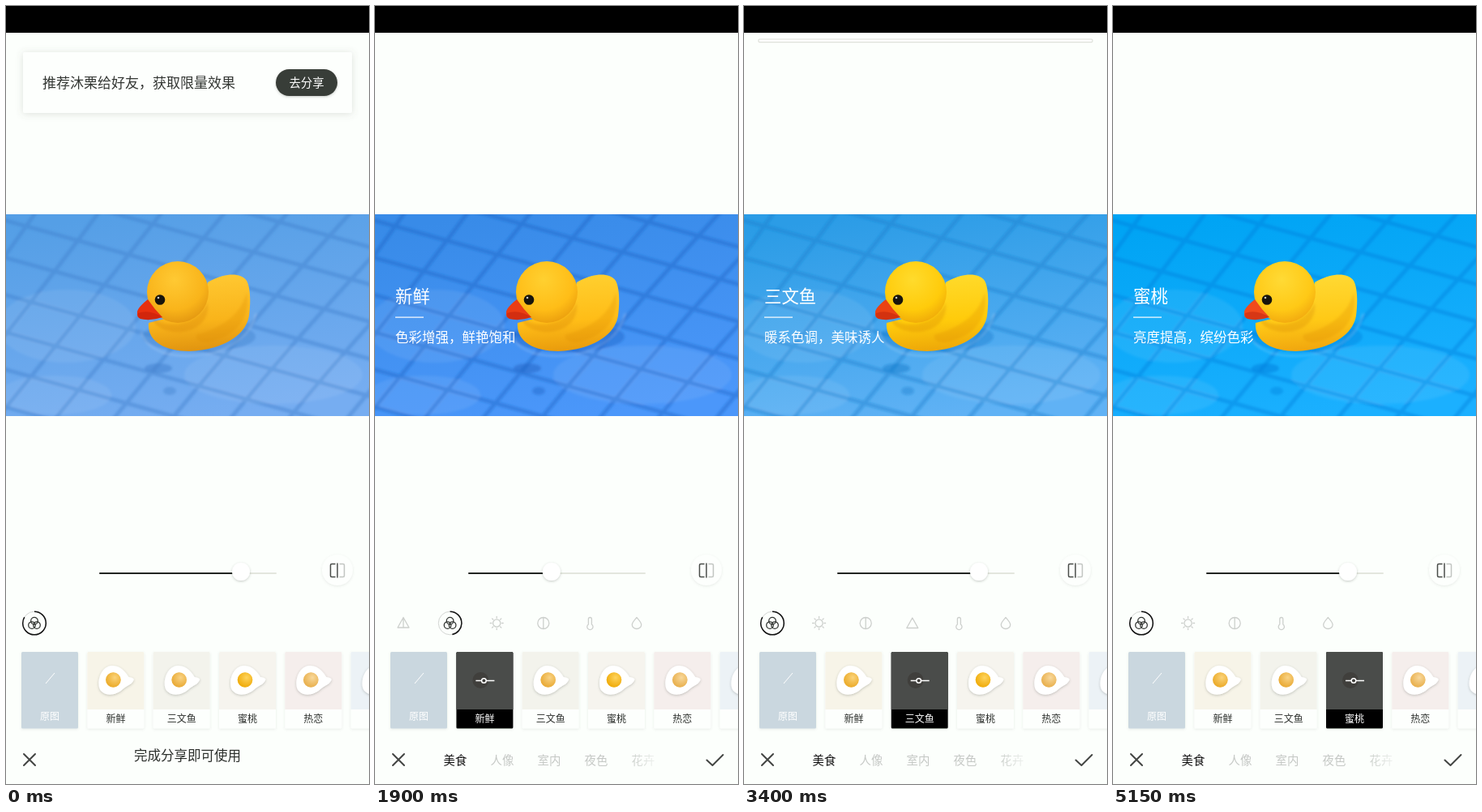
These frames come from a looping animation (448 px wide and 960 px high, 5.2 s). An HTML page:

```html
<!DOCTYPE html>
<html lang="zh-CN">
<head>
<meta charset="utf-8">
<title>滤镜</title>
<style>
  html, body { margin: 0; width: 100%; height: 100%; overflow: hidden; background: #fefefe; }
  svg { display: block; width: 100vw; height: 100vh; }
  text { font-family: "Noto Sans CJK SC", "Noto Sans CJK", "Noto Sans", sans-serif; }
  .mid { text-anchor: middle; }
  .line { fill: none; stroke-linecap: round; stroke-linejoin: round; }
  .thin { font-weight: 300; fill: #fff; }
</style>
</head>
<body>
<svg viewBox="0 0 448 960" xmlns="http://www.w3.org/2000/svg">
  <defs>
    <linearGradient id="water" x1="0.3" y1="0" x2="0.6" y2="1">
      <stop id="w0" offset="0"/><stop id="w1" offset="1"/>
    </linearGradient>
    <radialGradient id="head" cx="0.45" cy="0.3" r="0.75">
      <stop id="d0" offset="0"/><stop id="d1" offset="0.65"/><stop id="d2" offset="1"/>
    </radialGradient>
    <linearGradient id="body" x1="0.45" y1="0" x2="0.55" y2="1">
      <stop id="b0" offset="0"/><stop id="b1" offset="0.6"/><stop id="b2" offset="1"/>
    </linearGradient>
    <radialGradient id="yolk" cx="0.6" cy="0.35" r="0.7">
      <stop offset="0" stop-color="#fff" stop-opacity="0.35"/>
      <stop offset="1" stop-color="#c87800" stop-opacity="0.3"/>
    </radialGradient>
    <linearGradient id="fadeTab">
      <stop offset="0" stop-color="#ccd0cc"/><stop offset="1" stop-color="#eef1ee"/>
    </linearGradient>
    <filter id="soft" x="-20%" y="-20%" width="140%" height="140%"><feGaussianBlur stdDeviation="1.6"/></filter>
    <filter id="shade" x="-20%" y="-40%" width="140%" height="180%">
      <feDropShadow dx="0" dy="1" stdDeviation="5" flood-color="#60685c" flood-opacity="0.2"/>
    </filter>
    <filter id="small" x="-40%" y="-40%" width="180%" height="180%">
      <feDropShadow dx="0" dy="1" stdDeviation="1.6" flood-color="#404840" flood-opacity="0.3"/>
    </filter>
    <filter id="faint" x="-30%" y="-30%" width="160%" height="160%">
      <feDropShadow dx="0" dy="1" stdDeviation="1.5" flood-color="#606860" flood-opacity="0.14"/>
    </filter>
    <clipPath id="frame"><rect y="257" width="448" height="249"/></clipPath>
  </defs>

  <rect width="448" height="960" fill="#fcfffc"/>

  <rect id="bar" x="18" y="41" height="3.6" rx="1" fill="#fff" stroke="#dde0d9" stroke-width="1.2"/>
  <g id="banner">
    <rect x="21" y="57" width="406" height="75" rx="2" fill="#fdfffd" filter="url(#shade)"/>
    <text x="45" y="101" font-size="17" fill="#333633">推荐沐栗给好友，获取限量效果</text>
    <rect x="333" y="78" width="76" height="33" rx="16.5" fill="#393c37" filter="url(#small)"/>
    <text class="mid" x="371" y="99.5" font-size="14.4" fill="#fff">去分享</text>
  </g>
  <rect width="448" height="33" fill="#000"/>

  <g clip-path="url(#frame)">
    <rect y="257" width="448" height="249" fill="url(#water)"/>
    <g filter="url(#soft)">
      <path id="tiles" class="line" stroke-width="5" stroke-opacity="0.42"/>
      <g id="glow" fill="#fff" fill-opacity="0.07">
        <ellipse cx="75" cy="395" rx="85" ry="45"/>
        <ellipse cx="330" cy="455" rx="110" ry="36"/>
        <ellipse cx="60" cy="480" rx="70" ry="24"/>
      </g>
      <g id="ripple">
        <ellipse cx="238" cy="408" rx="70" ry="19" fill-opacity="0.4"/>
        <ellipse cx="188" cy="447" rx="17" ry="6" fill-opacity="0.5"/>
        <ellipse cx="202" cy="475" rx="8" ry="5" fill-opacity="0.4"/>
      </g>
      <path d="M167 403C176 431 215 435 247 430C280 424 304 403 308 380" class="line" stroke="#fff" stroke-opacity="0.22" stroke-width="1.6"/>
    </g>
    <path fill="url(#body)" d="M176 391C174 414 196 426 226 426C264 425 296 408 300 382C302 366 302 348 297 339C288 327 266 331 249 341L240 375Z"/>
    <path fill="#d98600" fill-opacity="0.25" filter="url(#soft)" d="M236 405C268 397 291 379 297 353C303 386 283 408 250 415C240 416 231 411 236 405Z"/>
    <path fill="#c97400" fill-opacity="0.22" filter="url(#soft)" d="M182 386C205 400 237 392 249 366C252 390 232 404 207 402C192 400 182 394 182 386Z"/>
    <ellipse cx="212" cy="353" rx="38" ry="38" fill="url(#head)"/>
    <path id="beak" d="M162 379C161 374 169 367 175 362Q183 374 193 384Q178 389 166 386Q161 384 162 379Z"/>
    <path d="M163 379Q177 374 193 384Q178 389 166 386Q162 384 163 379Z" fill="#a81408" fill-opacity="0.35"/>
    <circle cx="190" cy="362.500" r="6.300" fill="#17140c"/>
    <circle cx="188" cy="360" r="1.300" fill="#fff" fill-opacity="0.75"/>
    <g id="caption">
      <text id="title" class="thin" x="25" y="366" font-size="21.4"></text>
      <rect x="25" y="383.500" width="35" height="1.200" fill="#fff"/>
      <text id="note" class="thin" x="25" y="415" font-size="16.5"></text>
    </g>
  </g>

  <rect x="115" y="699" width="219" height="2" rx="1" fill="#e3e6de"/>
  <rect id="level" x="115" y="699" height="2" rx="1" fill="#222522"/>
  <circle id="knob" cy="698" r="11" fill="#fff" filter="url(#small)"/>

  <circle cx="409" cy="696" r="19" fill="#fdfffd" filter="url(#faint)"/>
  <g class="line" stroke-width="1.5">
    <path d="M406 688.500H402Q400.500 688.500 400.500 690V703Q400.500 704.500 402 704.500H406" stroke="#4a4d4a"/>
    <path d="M409 688V705" stroke="#4a4d4a"/>
    <path d="M412 688.500H416Q417.500 688.500 417.500 690V703Q417.500 704.500 416 704.500H412" stroke="#c2c5c2"/>
  </g>

  <g id="tools"></g>
  <g id="picked">
    <circle cy="761.500" r="14.300" fill="none" stroke="#d3d6d3"/>
    <circle id="ring" cy="761.500" r="14.300" fill="none" stroke="#111" stroke-width="1.500" pathLength="1"/>
  </g>
  <g id="cards"></g>

  <path class="line" d="M22 923L36 937M36 923L22 937" stroke="#434643" stroke-width="2"/>
  <text id="locked" class="mid" x="224" y="931" font-size="16.5" fill="#2b2e2b">完成分享即可使用</text>
  <g id="tabs">
    <path class="line" d="M409.500 930.500L416.500 937L429.500 924" stroke="#434643" stroke-width="2"/>
  </g>
  <rect id="veil" width="448" height="960" fill="#fefefe"/>
</svg>

<script>
const LOOP = 5200, STEP = 50;
const $ = id => document.getElementById(id);
const set = (id, name, value) => $(id).setAttribute(name, value);
const show = (id, on) => set(id, 'display', on ? 'inline' : 'none');
const part = (t, from, span) => Math.min(1, Math.max(0, (t - from) / span));
const easeOut = p => 1 - (1 - p) ** 2;
const easeBoth = p => (1 - Math.cos(Math.PI * p)) / 2;

// tap: selection, look: picture grade arrives, ring: level dial starts
const scenes = [
  { tap: 0, look: 0, ring: -900, tools: ['rgb'], pick: 0, title: '', note: '' },
  { tap: 900, look: 1200, ring: 1150, tools: ['tent', 'rgb', 'sun', 'half', 'heat', 'drop'], pick: 1,
    title: '新鲜', note: '色彩增强，鲜艳饱和' },
  { tap: 2400, look: 2450, ring: 2500, tools: ['rgb', 'sun', 'half', 'tri', 'heat', 'drop'], pick: 0,
    title: '三文鱼', note: '暖系色调，美味诱人' },
  { tap: 3500, look: 3550, ring: 3600, tools: ['rgb', 'sun', 'half', 'heat', 'drop'], pick: 0,
    title: '蜜桃', note: '亮度提高，缤纷色彩' }
];

const looks = [
  { water: ['#559fe6', '#76adf1'], tile: '#3f7fcb', duck: ['#ffc933', '#f9b41a', '#e0930f'], beak: '#e8300f' },
  { water: ['#388be8', '#4b97fa'], tile: '#1f62c4', duck: ['#ffd030', '#ffbd17', '#e89a0c'], beak: '#ea3d14' },
  { water: ['#2b9ce6', '#60b2f5'], tile: '#167ccc', duck: ['#ffdb2c', '#ffcb0b', '#eda608'], beak: '#ea4213' },
  { water: ['#00a4f4', '#1bb0ff'], tile: '#007fdc', duck: ['#ffda35', '#ffc916', '#f0a50e'], beak: '#f04a1c' }
];

const rays = [...Array(8).keys()].map(i => {
  const c = Math.cos(i * Math.PI / 4), s = Math.sin(i * Math.PI / 4);
  return `M${c * 6.3} ${s * 6.3}L${c * 8} ${s * 8}`;
}).join('');
const disc = (x, y, r) => `M${x - r} ${y}a${r} ${r} 0 1 0 ${2 * r} 0a${r} ${r} 0 1 0 ${-2 * r} 0`;
const icons = {
  rgb: disc(0, -2.8, 4.3) + disc(-3, 2.6, 4.3) + disc(3, 2.6, 4.3),
  sun: disc(0, 0, 4.6) + rays,
  half: disc(0, 0, 7) + 'M0 -7V7',
  tri: 'M0 -6.500L7 6H-7Z',
  tent: 'M0 -7L7 5.500H-7ZM0 -7V5.500',
  heat: 'M-2 1.500V-5a2 2 0 0 1 4 0V1.500a3.600 3.600 0 1 1 -4 0Z',
  drop: 'M0 -7C3 -3.500 5.700 -1 5.700 2A5.700 5 0 0 1 -5.700 2C-5.700 -1 -3 -3.500 0 -7Z'
};
const slot = i => 35 + 57.6 * i;

function toolRow(scene) {
  return scene.tools.map((name, i) =>
    `<path class="line" transform="translate(${slot(i)} 761.5)" d="${icons[name]}" stroke-width="1.3"
      stroke="${i === scene.pick ? '#343734' : '#cdd0cd'}"/>`).join('');
}

const cards = [
  ['新鲜', '#f7f4e8', '#f9bd35'], ['三文鱼', '#f3f3ec', '#f6bc45'], ['蜜桃', '#f6f4ee', '#ffbe08'],
  ['热恋', '#f5eeec', '#f5c468'], ['', '#ecf2f6', '#f5c468']
];

function cardRow(active) {
  const plain = `<rect x="19" y="797" width="70" height="94.5" rx="1.5" fill="#cad7df" filter="url(#faint)"/>
    <path d="M49 836L60 823" stroke="#fff"/>
    <text class="mid" x="54" y="881" font-size="12" fill="#fff">原图</text>`;
  return plain + cards.map(([name, tint, yolk], i) => {
    const x = 100.4 + 81.3 * i, on = i + 1 === active;
    const egg = `<g transform="translate(${x + 32} 832)">
      <path d="M-18 4C-18 -5 -13 -17 -2 -18C9 -19 16 -9 19 -4C25 -3 27 -2 24 2C21 6 18 6 13 10C6 17 -3 19 -9 17C-15 15 -18 11 -18 4Z"
        fill="#fff" filter="url(#small)"/>
      <circle r="9.3" cy="-0.5" fill="${yolk}"/><circle r="9.3" cy="-0.5" fill="url(#yolk)"/></g>`;
    const dial = `<circle cx="${x + 30}" cy="832" r="10" fill="#403f3c"/>
      <path d="M${x + 24} 832.500H${x + 31}M${x + 37} 832.500H${x + 47}" stroke="#fff" stroke-width="1.600"/>
      <circle cx="${x + 34}" cy="832.500" r="2.800" fill="none" stroke="#fff" stroke-width="1.500"/>`;
    return `<rect x="${x}" y="797" width="70" height="94.5" rx="1.5" fill="${on ? '#000' : '#fdfffd'}" filter="url(#faint)"/>
      <path d="M${x} 868V798.500q0 -1.500 1.500 -1.500h67q1.500 0 1.500 1.500V868Z" fill="${on ? '#4a4c4a' : tint}"/>
      ${on ? dial : egg}
      <text class="mid" x="${x + 35}" y="884" font-size="12" fill="${on ? '#fff' : '#2d302d'}">${name}</text>`;
  }).join('');
}

$('tabs').innerHTML += ['美食', '人像', '室内', '夜色', '花卉'].map((name, i) =>
  `<text class="mid" x="${99 + 58 * i}" y="936" font-size="14.4"
    fill="${i === 0 ? '#111' : i === 4 ? 'url(#fadeTab)' : '#c5c8c5'}">${name}</text>`).join('');

let grid = '';
for (let i = -4; i < 7; i++) grid += `M-10 ${262 + 46 * i}L458 ${392 + 46 * i}`;
for (let i = 0; i < 11; i++) grid += `M${40 + 78 * i} 250Q${-50 + 72 * i} 380 ${-160 + 72 * i} 515`;
set('tiles', 'd', grid);

let sceneNow = -1, lookNow = -1;

function paintScene(n) {
  const s = scenes[n];
  $('tools').innerHTML = toolRow(s);
  $('cards').innerHTML = cardRow(n);
  $('title').textContent = s.title;
  $('note').textContent = s.note;
  set('picked', 'transform', `translate(${slot(s.pick)} 0)`);
  set('ring', 'transform', 'rotate(-90 0 761.5)');
  show('locked', n === 0);
  show('tabs', n > 0);
  sceneNow = n;
}

function paintLook(n) {
  const l = looks[n];
  l.water.forEach((c, i) => set('w' + i, 'stop-color', c));
  l.duck.forEach((c, i) => { set('d' + i, 'stop-color', c); set('b' + i, 'stop-color', c); });
  set('tiles', 'stroke', l.tile);
  set('ripple', 'fill', l.tile);
  set('beak', 'fill', l.beak);
  lookNow = n;
}

function draw(t) {
  const n = scenes.filter(s => t >= s.tap).length - 1;
  const look = scenes.filter(s => t >= s.look).length - 1;
  const s = scenes[n];
  if (n !== sceneNow) paintScene(n);
  if (look !== lookNow) paintLook(look);

  const lift = easeBoth(part(t, 850, 250));
  set('banner', 'transform', `translate(0 ${-104 * lift})`);
  show('banner', lift < 1);

  const first = t < 1300;
  const grow = easeOut(first ? part(t, 950, 240) : part(t, 2450, 750));
  set('bar', 'width', 412 * grow);
  show('bar', grow > 0 && (first || t < 3500));

  const enter = easeOut(part(t, s.tap + 100, 300));
  set('caption', 'transform', `translate(${-50 * (1 - enter)} 0)`);
  set('caption', 'opacity', Math.min(1, enter * 1.3));

  const knob = n === 1 ? 290 - 102 * easeBoth(part(t, 1550, 550)) : 290;
  set('knob', 'cx', knob);
  set('level', 'width', knob - 115);
  const dial = (knob - 126) / 196 * part(t, s.ring, 300);
  set('ring', 'stroke-dasharray', `${dial} 2`);
  show('ring', dial > 0);

  set('veil', 'opacity', t < 4500 ? part(t, 3850, 350) : 1 - part(t, 4800, 350));
}

function tick(now) {
  draw(Math.floor(now % LOOP / STEP) * STEP);
  requestAnimationFrame(tick);
}
draw(0);
requestAnimationFrame(tick);
</script>
</body>
</html>
```
